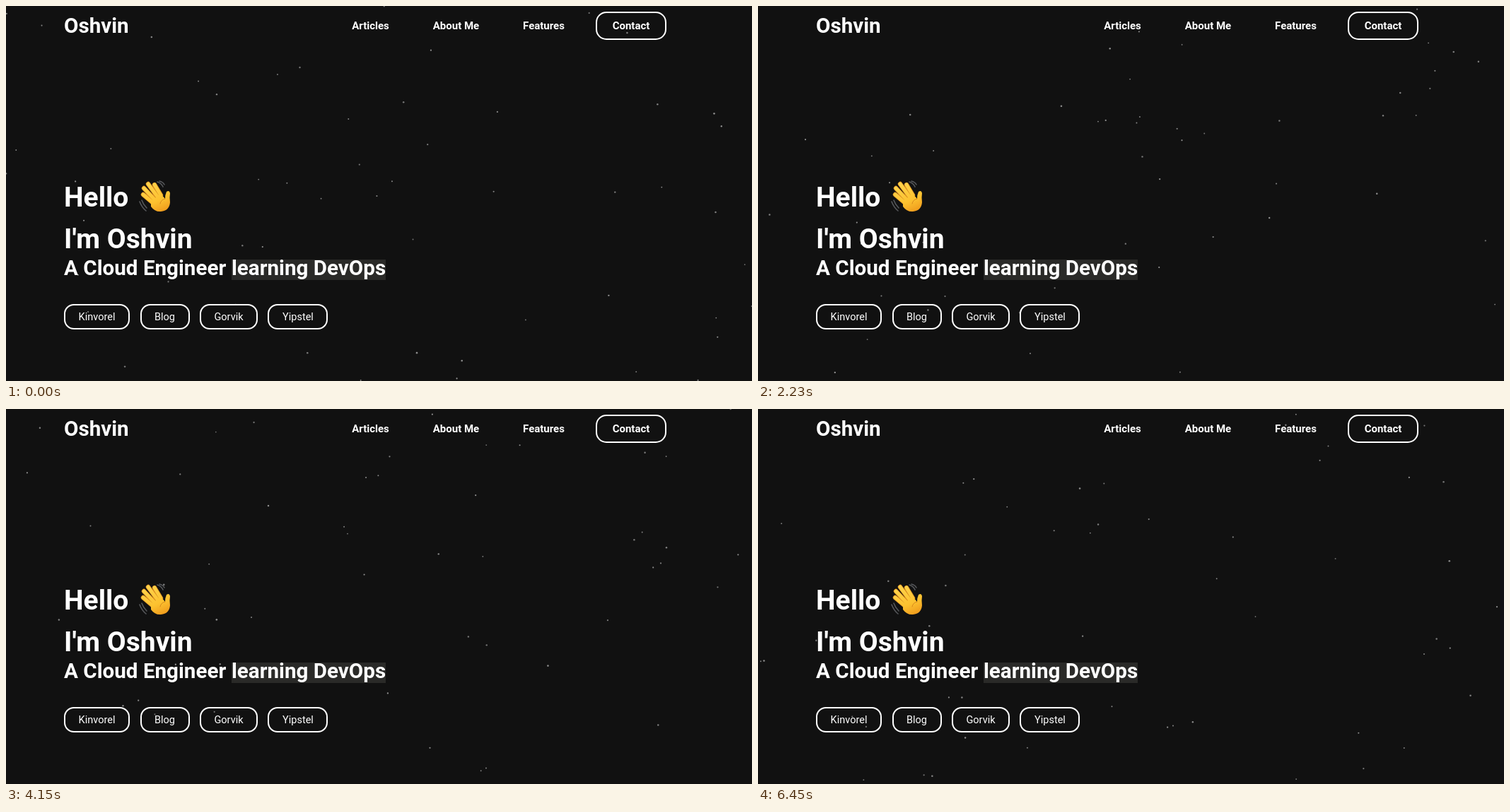
Recreate the animation shown at these times as an HTML page with a canvas. Size 1055 px wide and 531 px high, loop 6530 ms.

```html
<!DOCTYPE html>
<html lang="en">
<head>
<meta charset="utf-8">
<title>Portfolio</title>
<style>
html, body { margin: 0; width: 100%; height: 100%; overflow: hidden; background: #111; }
canvas, svg { position: absolute; left: 0; top: 0; }
text { fill: #fff; font-family: Roboto, sans-serif; font-weight: 700; }
.logo, .role { font-size: 29.6px; }
.nav { font-size: 15px; }
.big { font-size: 39px; }
.link { font-size: 14.5px; font-weight: 400; }
.nav, .link { text-anchor: middle; }
.box { fill: none; stroke: #fff; stroke-width: 2; }
.hand { fill: none; stroke-linecap: round; stroke-linejoin: round; }
</style>
</head>
<body>
<canvas id="sky" width="1055" height="531"></canvas>
<svg width="1055" height="531" viewBox="0 0 1055 531">
  <defs>
    <linearGradient id="skin" gradientUnits="userSpaceOnUse" x1="204" y1="252" x2="222" y2="292">
      <stop offset="0" stop-color="#ffd24a"/>
      <stop offset=".6" stop-color="#fcc12f"/>
      <stop offset="1" stop-color="#ef9a1c"/>
    </linearGradient>
    <path id="fingers" d="M207 278L194 267M211 275L195 258M215 271L201 252M219 268L210 253"/>
  </defs>

  <text class="logo" x="82" y="38">Oshvin</text>
  <text class="nav" x="515.5" y="33">Articles</text>
  <text class="nav" x="636.5" y="33">About Me</text>
  <text class="nav" x="760.5" y="33">Features</text>
  <text class="nav" x="884" y="33">Contact</text>
  <rect class="box" x="835" y="9" width="98" height="38" rx="14"/>

  <text class="big" x="82" y="284">Hello</text>
  <g class="hand">
    <path d="M214 249q6 2 8 7M217 248q5 1 7 5M189 277q3 8 9 13M192 275q2 6 7 11" stroke="#55575a" stroke-width="1.6"/>
    <use href="#fingers" stroke="#d98a1e" stroke-width="6.4"/>
    <use href="#fingers" stroke="url(#skin)" stroke-width="5"/>
    <path d="M205 277L218 266Q223 270 225 273Q225 267 227 263Q231 260 232 265Q231 271 232 278Q231 290 219 291Q211 292 205 284Z" fill="url(#skin)"/>
    <path d="M225 273Q219 274 218 280" stroke="#d98a1e"/>
  </g>

  <text class="big" x="82" y="343">I'm Oshvin</text>
  <rect x="319" y="359" width="218" height="29" fill="#2a2a28"/>
  <text class="role" x="82" y="381">A Cloud Engineer</text>
  <text class="role" x="319" y="381">learning DevOps</text>

  <rect class="box" x="83" y="423" width="91" height="34" rx="13"/>
  <rect class="box" x="191" y="423" width="68" height="34" rx="13"/>
  <rect class="box" x="275" y="423" width="80" height="34" rx="13"/>
  <rect class="box" x="371" y="423" width="83" height="34" rx="13"/>
  <text class="link" x="128.5" y="445">Kinvorel</text>
  <text class="link" x="224.5" y="445">Blog</text>
  <text class="link" x="315" y="445">Gorvik</text>
  <text class="link" x="413" y="445">Yipstel</text>
</svg>
<script>
const W = 1055, H = 531, LOOP = 6530, STEP = LOOP / 85;
const CUT = 5150, SKIP = 3190; // the drift leaps ahead once per loop
const COUNT = 54, SPEED = 85;  // top speed per axis, pixels per second
const ctx = document.getElementById('sky').getContext('2d');

let seed = 11;
const rnd = () => (seed = seed * 16807 % 2147483647) / 2147483647;
const speed = () => (rnd() * 2 - 1) * SPEED;
const wrap = (v, n) => ((v % n) + n) % n;

const dots = Array.from({ length: COUNT }, () => ({
  x: rnd() * W, y: rnd() * H, vx: speed(), vy: speed(),
  r: 0.9 + rnd() * 0.4, alpha: 0.4 + rnd() * 0.15
}));

function draw(now) {
  const t = now % LOOP;
  const held = Math.floor((t + 5) / STEP) * STEP;
  const s = (held < CUT ? held : held + SKIP) / 1000;
  ctx.clearRect(0, 0, W, H);
  ctx.fillStyle = '#fff';
  for (const d of dots) {
    ctx.globalAlpha = d.alpha;
    ctx.beginPath();
    ctx.arc(wrap(d.x + d.vx * s, W), wrap(d.y + d.vy * s, H), d.r, 0, 2 * Math.PI);
    ctx.fill();
  }
}

let start;
function tick(now) {
  start ??= now;
  draw(now - start);
  requestAnimationFrame(tick);
}
draw(0);
requestAnimationFrame(tick);
</script>
</body>
</html>
```
